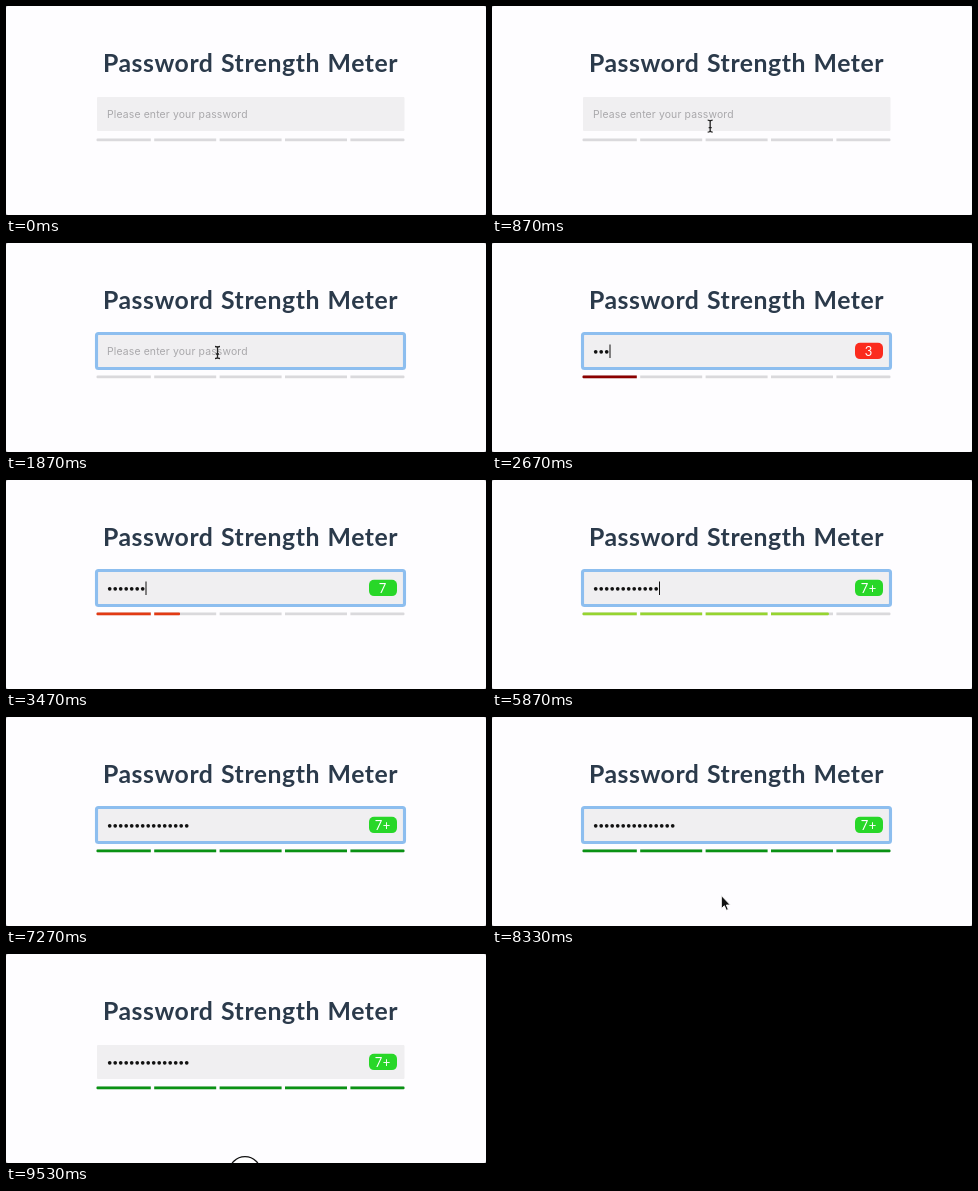
Write an HTML page that moves like this. It is 480 by 209 pixels and loops after 9590 ms.

```html
<!DOCTYPE html>
<html lang="en">
<head>
<meta charset="utf-8">
<title>Password Strength Meter</title>
<style>
  html, body { margin: 0; width: 100%; height: 100%; overflow: hidden; background: #a6a5a8; }
  svg { display: block; width: 480px; height: 209px; }
  .title { font: 700 24.8px Lato, sans-serif; letter-spacing: .54px; word-spacing: 1px; fill: #2b3a4b; }
  .hint { font: 10.4px Inter, sans-serif; letter-spacing: .15px; fill: #a9a8ab; }
  .count { font: 13px Lato, sans-serif; letter-spacing: .5px; fill: #fff; }
</style>
</head>
<body>
<svg viewBox="0 0 480 209">
  <rect width="480" height="209" rx="2" fill="#fefdff"/>
  <text class="title" x="244.5" y="65.8" text-anchor="middle">Password Strength Meter</text>
  <rect x="91" y="91" width="307.5" height="34" rx="1" fill="#f0eff1"/>
  <rect id="ring" x="90.5" y="90.5" width="308" height="35" rx="2" fill="none" stroke="#8dbeef" stroke-width="3.1"/>
  <text id="hint" class="hint" x="101" y="112.3">Please enter your password</text>
  <g id="dots" fill="#111"></g>
  <rect id="caret" y="101.5" width="1" height="13.5" fill="#111"/>
  <g id="badge">
    <rect id="pill" x="363" y="99.8" width="28" height="16.3" rx="5"/>
    <text id="count" class="count" x="376.8" y="112.6" text-anchor="middle"></text>
  </g>
  <rect x="90.5" y="132.6" width="308" height="2.6" rx="1" fill="#dad9dc"/>
  <rect id="fill" x="90.5" y="132.6" height="2.6" rx="1"/>
  <g id="gaps" fill="#fefdff"></g>
  <circle id="button" cx="239" cy="218.5" r="15.8" fill="#fff" stroke="#111" stroke-width="1.3"/>
  <path id="arrow" d="M0 0V13L3 10.2L5 14.8L7 14L5 9.5H9Z" fill="#111" stroke="#fff" stroke-width=".9"/>
  <path id="beam" d="M-2.5-6Q0-6 0-4.5Q0-6 2.5-6M0-5V5M-2.5 6Q0 6 0 4.5Q0 6 2.5 6M-1.5 1.5H1.5" fill="none" stroke="#222" stroke-width="1.3"/>
</svg>
<script>
const LOOP = 9590, FOCUS = 1330, BLUR = 8330;
const $ = id => document.getElementById(id);
const clamp = v => Math.max(0, Math.min(1, v));
const ease = v => (v = clamp(v), v * v * (3 - 2 * v));
const mix = (a, b, k) => a + (b - a) * k;
const show = (id, on) => $(id).setAttribute('opacity', +on);
const repeat = (n, f) => Array.from({ length: n }, (_, i) => f(i));

// Typing comes in three even bursts.
const burst = (start, step, n) => repeat(n, i => start + step * i);
const keys = [...burst(2270, 166.6, 7), ...burst(3940, 175, 5), ...burst(5910, 320, 3)];

// Each level begins with a certain keystroke and adds a fifth of the bar.
const levels = [1, 7, 9, 12, 14].map(n => keys[n - 1]);
const colours = ['#dad9dc', 'darkred', '#ec4016', '#f4a018', '#96d430', '#0a9214'];

$('gaps').innerHTML = repeat(4, i =>
  `<rect x="${144.8 + 65.4 * i}" y="132" width="3.4" height="4"/>`).join('');

function drawPointer(t) {
  const away = t > 5000;
  const k = away ? ease((t - 7330) / 1620) : 1 - ease((t - 70) / 1060);
  const x = mix(211.5, away ? 238 : 256, k), y = mix(109.5, away ? 212 : 180, k);
  const visible = t >= 70 && t < keys[0] || t >= 7330 && t < 9000;
  const inside = y < 125;
  for (const id of ['arrow', 'beam']) {
    $(id).setAttribute('transform', `translate(${x} ${y})`);
    show(id, visible && inside === (id === 'beam'));
  }
}

function drawField(t, typed) {
  show('ring', ease((t - FOCUS) / 150) * (1 - ease((t - BLUR) / 150)));
  show('hint', !typed);
  $('dots').innerHTML = repeat(typed, i =>
    `<circle cx="${103.7 + 5.5 * i}" cy="108.8" r="1.85"/>`).join('');

  const idle = t - (typed ? keys[typed - 1] : FOCUS);
  $('caret').setAttribute('x', 101 + 5.5 * typed);
  show('caret', t >= FOCUS && t < BLUR && idle % 1000 < 500);

  show('badge', typed > 0);
  $('pill').setAttribute('fill', typed < 7 ? '#fb2b1e' : '#28d728');
  $('count').textContent = typed > 7 ? '7+' : typed;
}

function drawBar(t) {
  const level = levels.filter(k => k <= t).length;
  const last = Math.max(0, level - 1), age = t - (levels[last] || 0);
  const width = 308 * .2 * mix(last, level, ease(age / 500));
  const tint = 100 * ease(age / 250);
  $('fill').setAttribute('width', width);
  $('fill').style.fill = `color-mix(in srgb, ${colours[level]} ${tint}%, ${colours[last]})`;
}

function draw(t) {
  drawField(t, keys.filter(k => k <= t).length);
  drawBar(t);
  drawPointer(t);
  show('button', t >= 8870);
}

const start = performance.now();
function tick() {
  draw((performance.now() - start) % LOOP);
  requestAnimationFrame(tick);
}
tick();
</script>
</body>
</html>
```
